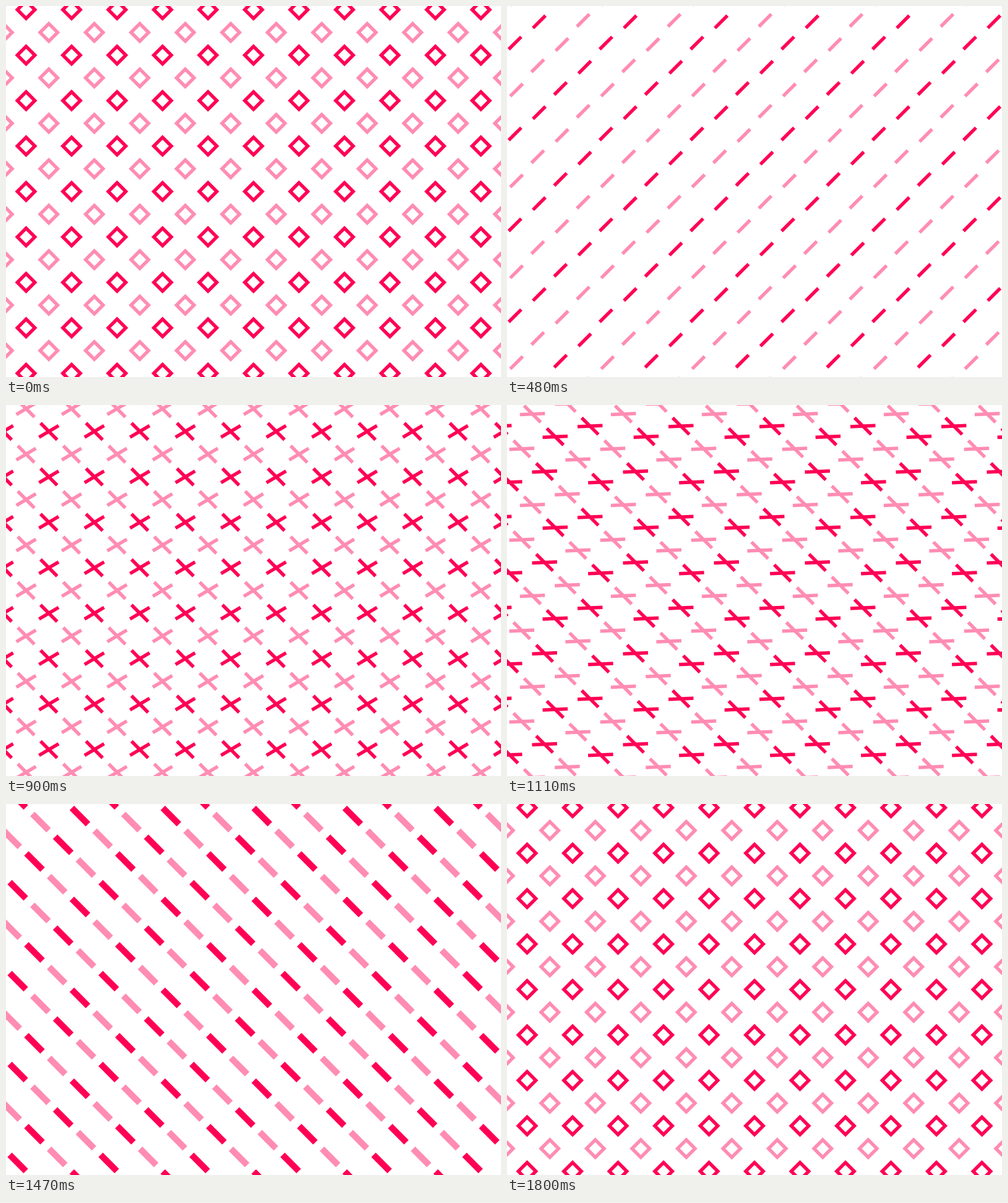
These frames come from a looping animation (800x600 px, 1.83 s). An HTML page with a canvas:

```html
<!DOCTYPE html>
<html lang="en">
<head>
<meta charset="utf-8">
<title>Diamonds and crosses</title>
<style>
html, body { margin: 0; width: 100%; height: 100%; overflow: hidden; background: #fff; }
canvas { display: block; }
</style>
</head>
<body>
<canvas id="stage" width="800" height="600"></canvas>
<script>
const ctx = document.getElementById('stage').getContext('2d');
const LOOP = 1830, STEP = 30, STEPS = 60;
const GAP = 73.5, LINE = 5.5;
const DARK = '#ff0055', LIGHT = '#ff8cb3';
const FOLD = 0.21, UNFOLD = 0.77;

// Piecewise linear value from [time, value] pairs
function track(keys, p) {
  for (let i = 1; i < keys.length; i++) {
    const [t0, v0] = keys[i - 1], [t1, v1] = keys[i];
    if (p <= t1) return v0 + (v1 - v0) * Math.max(0, (p - t0) / (t1 - t0));
  }
  return keys[keys.length - 1][1];
}

const ramp = (p, from, to) => Math.min(1, Math.max(0, (p - from) / (to - from)));

// Half sizes of the frame, across and along the first bar direction
const HALF_U = [[0, 10], [0.15, 2.9], [FOLD, 0], [UNFOLD, 16.25], [0.817, 15.7], [1, 10]];
const HALF_V = [[0, 10], [0.15, 11.75], [FOLD, 11.6], [UNFOLD, 0], [0.817, 2.4], [1, 10]];
const LEN_SLOW = [[0.267, 28.5], [0.4, 33.5], [0.617, 40.5], [UNFOLD, 38]];
const LEN_FAST = [[0.267, 28.5], [0.4, 38], [UNFOLD, 38]];

function bar(path, length, turn) {
  const x = Math.sin(turn) * length / 2, y = -Math.cos(turn) * length / 2;
  path.moveTo(-x, -y);
  path.lineTo(x, y);
}

function shape(p) {
  const path = new Path2D();
  if (p < FOLD || p > UNFOLD) {
    const u = track(HALF_U, p), v = track(HALF_V, p);
    path.rect(-u, -v, 2 * u, 2 * v);
  } else {
    const quarter = Math.PI / 2;
    const fast = 1 - Math.pow(1 - ramp(p, 0.267, 0.45), 1.15);
    const slow = Math.pow(ramp(p, 0.4, UNFOLD), 1.4);
    bar(path, track(LEN_FAST, p), fast * quarter);
    bar(path, track(LEN_SLOW, p), slow * quarter);
  }
  return path;
}

function stamp(path, x, y, color) {
  ctx.setTransform(Math.SQRT1_2, Math.SQRT1_2, -Math.SQRT1_2, Math.SQRT1_2, x, y);
  ctx.strokeStyle = color;
  ctx.stroke(path);
}

function draw(p) {
  ctx.setTransform(1, 0, 0, 1, 0, 0);
  ctx.fillStyle = '#fff';
  ctx.fillRect(0, 0, 800, 600);
  ctx.lineWidth = LINE;
  const path = shape(p);
  for (let j = -6; j <= 6; j++) {
    for (let i = -8; i <= 8; i++) {
      // Neighbouring diagonals slide in opposite directions
      const shift = (i + j) % 2 ? p * GAP : -p * GAP;
      const x = 400 + i * GAP + shift, y = 300 + j * GAP + shift;
      stamp(path, x, y, DARK);
      stamp(path, x + GAP / 2, y + GAP / 2, LIGHT);
    }
  }
}

const start = performance.now();
function tick() {
  const t = (performance.now() - start) % LOOP;
  draw(Math.floor(t / STEP) / STEPS);
  requestAnimationFrame(tick);
}
tick();
</script>
</body>
</html>
```
